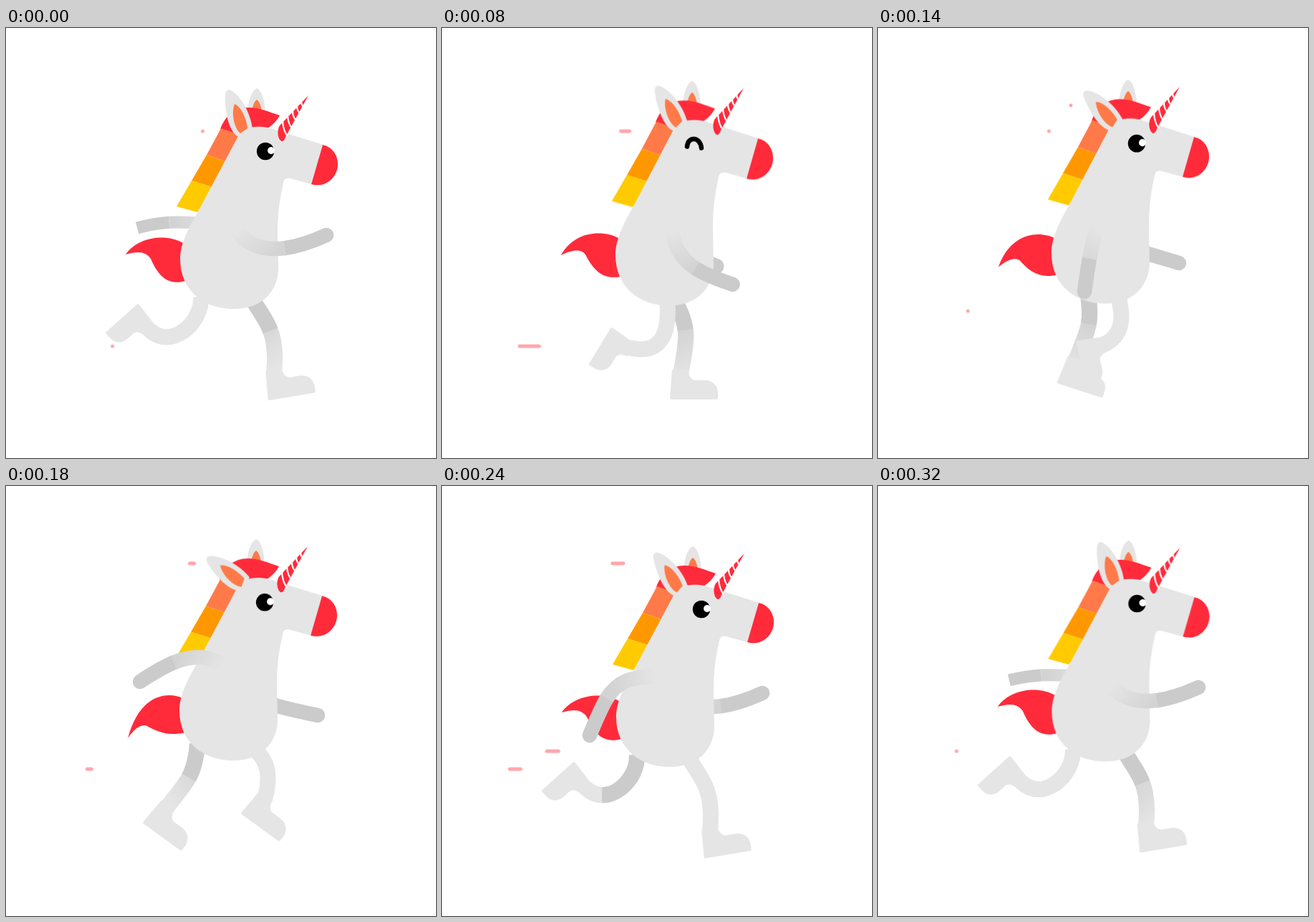
An HTML page without scripts for the animation above (340 ms loop, 600x600 px).

```html
<!DOCTYPE html>
<html lang="en">
<head>
<meta charset="utf-8">
<title>Running unicorn</title>
<style>
  html, body { margin: 0; width: 100%; height: 100%; overflow: hidden; background: #fff; }
  svg { display: block; width: 100vw; height: 100vh; }

  .light { fill: #e5e5e5; }
  .red { fill: #ff2b3b; }
  .coral { fill: #ff7a48; }
  .limb { fill: none; stroke: #e5e5e5; stroke-width: 20.5; }
  .leg { stroke-width: 22; }
  .shade { stroke: #cbcbcb; }
  .upper { stroke: url(#arm-tone); stroke-dasharray: 58 200; stroke-linecap: butt !important; }
  .fore { stroke-dasharray: 100 200; stroke-dashoffset: -58; stroke-linecap: round; }
  .whole { stroke: url(#leg-tone); stroke-dasharray: none !important; }

  .anim, .dash path { animation: .34s linear infinite; animation-name: var(--move); }
  .dash path { fill: none; stroke: #ffa6ac; stroke-width: 5; stroke-linecap: round; animation-delay: var(--delay, 0s); }
  .long { --move: dash-long, show-long; }
  .short { --move: dash-short, show-short; }
  .slow { --move: dash-short, show-slow; }

  .body { --move: bounce; transform-origin: 0 392px; }
  .ear { --move: ear; transform-origin: 334px 145px; }
  .tail { --move: tail; }
  .near-arm { --move: near-arm; }
  .far-arm { --move: far-arm; }
  .near-leg { --move: near-leg; }
  .far-leg { --move: far-leg; }
  .near-foot { --move: near-foot; }
  .far-foot { --move: far-foot; }
  .open { --move: eye-open; }
  .closed { --move: eye-closed; }

  @keyframes bounce {
    0% { transform: none; animation-timing-function: steps(2); }
    11.76% { transform: translate(-1px, -2px) scaleY(1); animation-timing-function: steps(3); }
    29.41% { transform: translate(-1px, -6px) scaleY(1.028); animation-timing-function: steps(4); }
    52.94% { transform: translate(-1px, -9px) scaleY(1.003); animation-timing-function: steps(3); }
    70.58% { transform: none; animation-timing-function: steps(3); }
    88.23% { transform: translate(-1px, -2px) scaleY(1); animation-timing-function: steps(1); }
    94.11% { transform: translate(-.5px, -7.5px) scaleY(1.002); animation-timing-function: steps(1); }
    100% { transform: none; }
  }
  @keyframes ear {
    0% { transform: rotate(0deg); animation-timing-function: steps(2); }
    11.76% { transform: rotate(-4.5deg); animation-timing-function: steps(3); }
    29.41% { transform: rotate(-12deg); animation-timing-function: steps(4); }
    52.94% { transform: rotate(-33.5deg); animation-timing-function: steps(3); }
    70.58% { transform: rotate(-13deg); animation-timing-function: steps(3); }
    88.23% { transform: rotate(-4deg); animation-timing-function: steps(1); }
    94.11%, 100% { transform: rotate(0deg); }
  }
  @keyframes tail {
    0%, 70.58%, 100% { d: path("M247,300 C225,287 185,290 167,316 C185,311 195,312 202,322 C212,345 225,360 250,353Z"); animation-timing-function: steps(3); }
    0% { animation-timing-function: steps(2); }
    11.76%, 88.23% { d: path("M247,298 C225,286 185,287 166,321 C182,313 194,312 200,320 C212,343 225,356 250,350Z"); animation-timing-function: steps(3); }
    88.23% { animation-timing-function: steps(1); }
    29.41% { d: path("M247,291 C225,279 185,280 166,315 C182,307 194,306 200,314 C212,337 225,350 250,345Z"); animation-timing-function: steps(4); }
    52.94% { d: path("M247,296 C230,288 188,285 170,352 C178,340 186,333 195,334 C210,342 225,350 250,344Z"); animation-timing-function: steps(3); }
    94.11% { d: path("M247,292 C225,279 185,282 167,308 C185,303 195,304 202,314 C212,337 225,352 250,345Z"); animation-timing-function: steps(1); }
  }
  @keyframes near-arm {
    0%, 100% { d: path("M318,276 C342,319 392,314 447,289"); animation-timing-function: steps(2); }
    11.76% { d: path("M317,275 C328,325 350,340 421,349"); animation-timing-function: steps(3); }
    29.41% { d: path("M320,265 C322,315 335,335 398,362"); animation-timing-function: steps(2); }
    41.17% { d: path("M312,260 C296,305 294,328 288,368"); animation-timing-function: steps(2); }
    52.94% { d: path("M305,252 C270,228 240,238 187,273"); animation-timing-function: steps(3); }
    70.58% { d: path("M298,266 C240,266 232,285 206,348"); animation-timing-function: steps(3); }
    88.23% { d: path("M320,270 C322,319 335,339 398,366"); animation-timing-function: steps(1); }
    94.11% { d: path("M318,268 C342,311 392,306 447,281"); animation-timing-function: steps(1); }
  }
  @keyframes far-arm {
    0%, 100% { d: path("M290,274 C250,270 225,268 183,279"); stroke-width: 17; stroke-linecap: butt; animation-timing-function: steps(2); }
    11.76% { d: path("M300,300 C310,310 320,320 340,325"); stroke-width: 20.5; stroke-linecap: round; animation-timing-function: steps(3); }
    29.41% { d: path("M320,290 C340,315 365,318 405,336"); stroke-width: 20.5; animation-timing-function: steps(4); }
    52.94% { d: path("M300,270 C330,297 375,307 435,320"); stroke-width: 20.5; animation-timing-function: steps(3); }
    70.58% { d: path("M318,276 C342,319 392,314 447,289"); stroke-width: 20.5; animation-timing-function: steps(3); }
    88.23% { d: path("M320,294 C340,319 365,322 405,340"); stroke-width: 20.5; stroke-linecap: round; animation-timing-function: steps(1); }
    94.11% { d: path("M290,266 C250,263 225,261 183,271"); stroke-width: 17; stroke-linecap: butt; animation-timing-function: steps(1); }
  }
  @keyframes near-leg {
    0%, 100% { d: path("M272,375 C274,412 230,450 200,421"); animation-timing-function: steps(2); }
    11.76% { d: path("M300,380 C308,425 298,458 243,446"); animation-timing-function: steps(3); }
    29.41% { d: path("M321,378 C324,430 308,456 270,446"); animation-timing-function: steps(4); }
    52.94% { d: path("M348,368 C366,385 370,405 361,437"); animation-timing-function: steps(3); }
    70.58% { d: path("M345,380 C360,408 380,420 374,482"); animation-timing-function: steps(3); }
    88.23% { d: path("M318,380 C335,415 338,425 326,482"); animation-timing-function: steps(1); }
    94.11% { d: path("M272,367 C274,404 230,442 200,413"); animation-timing-function: steps(1); }
  }
  @keyframes far-leg {
    0%, 100% { d: path("M345,380 C360,408 380,420 374,482"); stroke-dasharray: 45 200; animation-timing-function: steps(2); }
    11.76% { d: path("M335,378 C358,415 358,425 347,482"); stroke-dasharray: 47 200; animation-timing-function: steps(3); }
    29.41% { d: path("M318,378 C335,415 338,425 326,482"); stroke-dasharray: 41 200; animation-timing-function: steps(4); }
    52.94% { d: path("M267,360 C264,405 250,415 224,449"); stroke-dasharray: 48 200; animation-timing-function: steps(3); }
    70.58% { d: path("M272,375 C274,412 230,450 200,421"); stroke-dasharray: 76 200; animation-timing-function: steps(3); }
    88.23% { d: path("M311,390 C318,430 300,456 270,449"); stroke-dasharray: 76 200; animation-timing-function: steps(1); }
    94.11% { d: path("M345,372 C360,400 380,412 374,474"); stroke-dasharray: 45 200; animation-timing-function: steps(1); }
  }
  @keyframes near-foot {
    0%, 100% { transform: translate(200px, 421px) rotate(138deg) scale(.92, 1); animation-timing-function: steps(2); }
    11.76% { transform: translate(244px, 448px) rotate(128deg) scale(.92, 1); animation-timing-function: steps(3); }
    29.41% { transform: translate(271px, 448px) rotate(118deg) scale(.92, 1); animation-timing-function: steps(4); }
    52.94% { transform: translate(361px, 434.5px) rotate(36deg) scale(1, 1); animation-timing-function: steps(3); }
    70.58% { transform: translate(373.5px, 480px) rotate(-9.5deg) scale(1, 1); animation-timing-function: steps(3); }
    88.23% { transform: translate(325px, 481px) rotate(0deg) scale(1, 1); animation-timing-function: steps(1); }
    94.11% { transform: translate(200px, 413px) rotate(138deg) scale(.92, 1); animation-timing-function: steps(1); }
  }
  @keyframes far-foot {
    0%, 100% { transform: translate(373.5px, 480px) rotate(-9.5deg) scale(1, 1); animation-timing-function: steps(2); }
    11.76% { transform: translate(346px, 481px) rotate(0deg) scale(1, 1); animation-timing-function: steps(3); }
    29.41% { transform: translate(325px, 480px) rotate(0deg) scale(1, 1); animation-timing-function: steps(4); }
    52.94% { transform: translate(224px, 447.5px) rotate(36deg) scale(1, 1); animation-timing-function: steps(3); }
    70.58% { transform: translate(200px, 421px) rotate(138deg) scale(.92, 1); animation-timing-function: steps(3); }
    88.23% { transform: translate(271px, 451px) rotate(118deg) scale(.92, 1); animation-timing-function: steps(1); }
    94.11% { transform: translate(373px, 472px) rotate(-9.5deg) scale(1, 1); animation-timing-function: steps(1); }
  }
  @keyframes eye-open {
    0%, 41.17%, 100% { opacity: 1; animation-timing-function: step-end; }
    23.52% { opacity: 0; animation-timing-function: step-end; }
  }
  @keyframes eye-closed {
    0%, 41.17%, 100% { opacity: 0; animation-timing-function: step-end; }
    23.52% { opacity: 1; animation-timing-function: step-end; }
  }
  @keyframes dash-long {
    0%, 41.17%, 100% { d: path("M0,0 H0"); animation-timing-function: steps(2); }
    11.76% { d: path("M-23,0 H-7"); animation-timing-function: steps(3); }
    29.41% { d: path("M-49,0 H-16"); animation-timing-function: steps(1); }
    35.29% { d: path("M-60,0 H-60"); animation-timing-function: steps(1); }
  }
  @keyframes dash-short {
    0%, 47.05%, 100% { d: path("M0,0 H0"); animation-timing-function: steps(2); }
    11.76% { d: path("M-12.5,0 H-6.5"); animation-timing-function: steps(3); }
    29.41% { d: path("M-31,0 H-16"); animation-timing-function: steps(2); }
    41.17% { d: path("M-36,0 H-36"); animation-timing-function: steps(1); }
  }
  @keyframes show-long {
    0% { opacity: 1; animation-timing-function: step-end; }
    41.17%, 100% { opacity: 0; }
  }
  @keyframes show-short {
    0% { opacity: 1; animation-timing-function: step-end; }
    47.05%, 100% { opacity: 0; }
  }
  @keyframes show-slow {
    0%, 88.23%, 100% { opacity: 1; animation-timing-function: step-end; }
    47.05% { opacity: 0; animation-timing-function: step-end; }
  }
</style>
</head>
<body>
<svg viewBox="0 0 600 600">
  <defs>
    <path id="foot" d="M-11,-3 L-14,36 q0,2 2,2 H51 q2,0 2,-2 V28 C53,18 45,11 34,11 H22 C16,11 13,6 11,-3Z"/>
    <radialGradient id="arm-tone" gradientUnits="userSpaceOnUse" cx="316" cy="264" r="80">
      <stop offset=".25" stop-color="#e5e5e5"/>
      <stop offset="1" stop-color="#d3d3d3"/>
    </radialGradient>
    <radialGradient id="leg-tone" gradientUnits="userSpaceOnUse" cx="320" cy="375" r="125">
      <stop offset=".36" stop-color="#d2d2d2"/>
      <stop offset=".9" stop-color="#e5e5e5"/>
    </radialGradient>
  </defs>

  <g class="dash">
    <g transform="translate(274.5 144)"><path class="short" d="M0,0 H0"/></g>
    <g transform="translate(148.5 444)"><path class="long" d="M0,0 H0"/></g>
    <g transform="translate(269 108)" style="--delay: -.2s"><path class="short" d="M0,0 H0"/></g>
    <g transform="translate(125.5 395)" style="--delay: -.2s"><path class="slow" d="M0,0 H0"/></g>
    <g transform="translate(169.5 370)" style="--delay: -.14s"><path class="long" d="M0,0 H0"/></g>
  </g>

  <path class="limb shade fore anim far-arm" pathLength="100" d="M290,274 C250,270 225,268 183,279"/>
  <path class="limb upper anim far-arm" pathLength="100" d="M290,274 C250,270 225,268 183,279"/>
  <path class="red anim tail" d="M247,300 C225,287 185,290 167,316 C185,311 195,312 202,322 C212,345 225,360 250,353Z"/>

  <path class="limb leg whole anim far-leg" d="M345,380 C360,408 380,420 374,482"/>
  <use class="light anim far-foot" href="#foot"/>
  <path class="limb leg shade anim far-leg" pathLength="100" d="M345,380 C360,408 380,420 374,482"/>
  <path class="limb leg anim near-leg" d="M272,375 C274,412 230,450 200,421"/>
  <use class="light anim near-foot" href="#foot"/>

  <g class="anim body">
    <path class="light" d="M350,84 C342,88 338,102 337,118 H362 C361,102 357,87 350,84Z"/>
    <path class="coral" d="M350,100 C346,103 344,109 343,117 H357 C356,109 354,103 350,100Z"/>
    <path class="red" d="M299,141 C306,122 320,111 338,111 C355,111 366,117 382,122 Q376,133 365,140 L342,142 L325,152Z"/>
    <path class="coral" d="M300,140 L330,150 L309,187 L280,177Z"/>
    <path fill="#ff9800" d="M280,177 L309,187 L291,223 L259,213Z"/>
    <path fill="#ffcb00" d="M259,213 L291,223 L267,257 L238,249Z"/>
    <path class="light" d="M325,149 C330,141 342,135 366,139 L443,163 L426,218 L397,210 Q388,208 387,216 C382,240 379,255 379,290 L380,338 C378,370 355,392 318,392 C278,392 243,368 243,322 C243,300 257,275 268,256Z"/>
    <path class="red" d="M442,163 C456,166 463,178 463,190 C463,208 446,224 426,218Z"/>

    <path class="red" d="M422,94 L382,136 C377,144 380,157 385,158 Q388,158 390,152Z"/>
    <path fill="none" stroke="#fff" stroke-width="2.2" d="M386,130 q1,14 7,21 M393,123 q1,11 6,17 M400,116 q0,8 5,13 M406,109 q0,6 4,10 M412,103 q0,4 3,7"/>

    <g class="anim open">
      <circle cx="362" cy="172" r="12.2"/>
      <circle cx="370" cy="171" r="5" fill="#fff"/>
    </g>
    <path class="anim closed" fill="none" stroke="#000" stroke-width="6.5" stroke-linecap="round" d="M343,174 C344,160 361,160 363,176"/>

    <g class="anim ear">
      <path class="light" d="M311,86 Q306,87 306,94 C305,122 313,147 325,152 Q336,151 344,142 C342,118 325,90 311,86Z"/>
      <path class="coral" d="M319,106 C314,118 318,140 327,147 L337,140 C335,124 327,109 319,106Z"/>
    </g>
  </g>

  <path class="limb shade fore anim near-arm" pathLength="100" d="M318,276 C342,319 392,314 447,289"/>
  <path class="limb upper anim near-arm" pathLength="100" d="M318,276 C342,319 392,314 447,289"/>
</svg>
</body>
</html>
```
